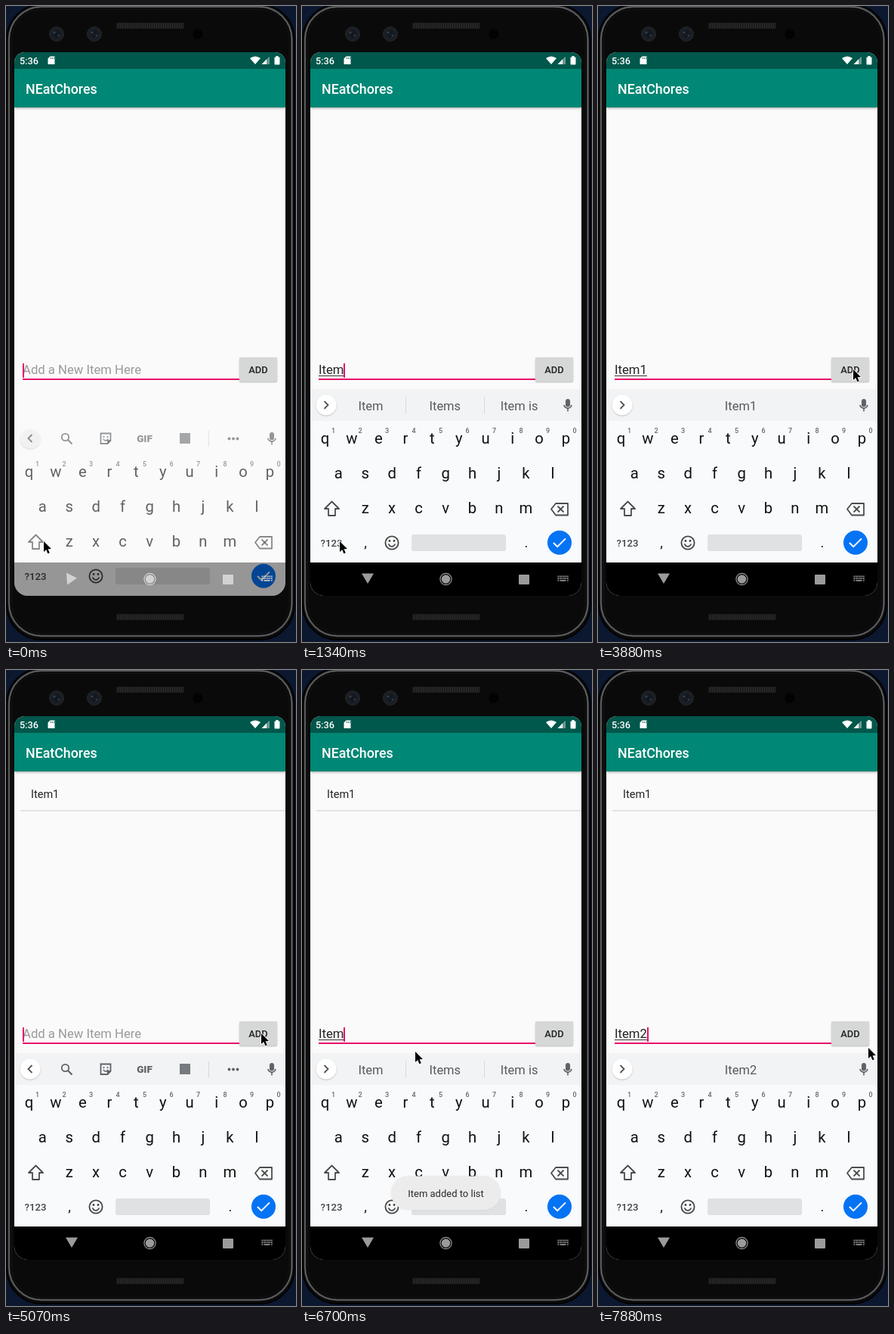
Animation of 384 by 840 pixels, one loop 8 s. Source, as an HTML page with a canvas:

```html
<!DOCTYPE html>
<html lang="en">
<head>
<meta charset="utf-8">
<title>Todo demo</title>
<style>
html, body { margin: 0; width: 100%; height: 100%; overflow: hidden; background: #0c1830; }
canvas { display: block; width: 384px; height: 840px; }
</style>
</head>
<body>
<canvas id="stage"></canvas>
<script>
const W = 384, H = 840, LOOP = 8000;
const canvas = document.getElementById('stage');
const ctx = canvas.getContext('2d');
const dpr = window.devicePixelRatio || 1;
canvas.width = W * dpr;
canvas.height = H * dpr;

const ACCENT = '#e8106a', ICON = '#5f6368';

// Each entry changes part of the state from its time on.
const events = [
  [0, { sliding: true, text: '', words: [], caret: true, mouse: [50, 707], toast: 0, pressed: false, listed: false }],
  [150, { sliding: false }],
  [300, { caret: false }],
  [900, { text: 'I', words: ['I', "I'm", "I'll"], caret: true }],
  [1050, { text: 'It', words: ['It', "It's", 'It is'] }],
  [1190, { text: 'Ite', words: ['Ite', 'Item', 'Items'] }],
  [1340, { text: 'Item', words: ['Item', 'Items', 'Item is'] }],
  [1940, { caret: false }],
  [2390, { text: 'Item1', words: ['Item1'], caret: true }],
  [2830, { caret: false }],
  [2980, { mouse: [82, 680] }],
  [3130, { mouse: [180, 601] }],
  [3280, { mouse: [290, 512] }],
  [3430, { mouse: [338, 480], caret: true }],
  [3880, { caret: false }],
  [4330, { caret: true }],
  [4920, { caret: false, pressed: true }],
  [5070, { text: '', words: [], caret: true, pressed: false, listed: true }],
  [5220, { toast: 0.5, mouse: [318, 483] }],
  [5360, { toast: 0.9, mouse: [250, 492] }],
  [5510, { toast: 1, mouse: [180, 501] }],
  [5660, { mouse: [150, 504], caret: false }],
  [6100, { caret: true }],
  [6250, { text: 'I', words: ['I', "I'm", "I'll"] }],
  [6550, { text: 'Ite', words: ['Ite', 'Item', 'Items'] }],
  [6700, { text: 'Item', words: ['Item', 'Items', 'Item is'] }],
  [7140, { caret: false, toast: 0.8 }],
  [7290, { toast: 0.3 }],
  [7440, { text: 'Item2', words: ['Item2'], caret: true, toast: 0 }],
  [7580, { mouse: [200, 504] }],
  [7730, { mouse: [300, 501] }],
  [7880, { mouse: [358, 499] }]
];

function stateAt(t) {
  const state = {};
  for (const [start, change] of events) if (start <= t) Object.assign(state, change);
  return state;
}

function rect(x, y, w, h, color) {
  ctx.fillStyle = color;
  ctx.fillRect(x, y, w, h);
}

function paint(fill, stroke, width) {
  if (fill) { ctx.fillStyle = fill; ctx.fill(); }
  if (stroke) { ctx.strokeStyle = stroke; ctx.lineWidth = width; ctx.stroke(); }
}

function box(x, y, w, h, r, fill, stroke, width = 1) {
  ctx.beginPath();
  ctx.roundRect(x, y, w, h, r);
  paint(fill, stroke, width);
}

function disc(x, y, r, fill, stroke, width = 1) {
  ctx.beginPath();
  ctx.arc(x, y, r, 0, Math.PI * 2);
  paint(fill, stroke, width);
}

function smile(x, y, r, color, width) {
  ctx.beginPath();
  ctx.arc(x, y, r, 0.2, Math.PI - 0.2);
  paint(null, color, width);
}

function trace(points, close) {
  ctx.beginPath();
  points.forEach(([x, y]) => ctx.lineTo(x, y));
  if (close) ctx.closePath();
}

function line(points, color, width = 2, close = false) {
  trace(points, close);
  paint(null, color, width);
}

function poly(points, color) {
  trace(points, true);
  paint(color);
}

function label(str, x, y, size, color, align = 'left', weight = 400) {
  ctx.font = `${weight} ${size}px Roboto, sans-serif`;
  ctx.textAlign = align;
  ctx.fillStyle = color;
  ctx.fillText(str, x, y);
}

function shadow(color, blur, dy) {
  ctx.shadowColor = color;
  ctx.shadowBlur = blur * dpr;
  ctx.shadowOffsetY = dy * dpr;
}

function noShadow() { shadow('transparent', 0, 0); }

function grille(y) {
  box(146, y, 90, 8, 2, '#1d1d1d');
  for (let x = 148; x < 235; x += 3) rect(x, y + 1, 1, 6, '#2a2a2a');
}

function phone() {
  rect(0, 0, W, H, '#0c1830');
  box(1, -2, 381, 839, 46, '#0b0b0c', '#030303', 2);
  box(4, 1, 374.5, 831, 43, '#080808', '#48494b', 2.5);
  box(4, 1, 374.5, 831, 43, null, '#66686b', 1);
  box(7.5, 4.5, 367.5, 824, 39, '#0a0a0a', '#151515');
  grille(22);
  grille(803);
  for (const x of [67, 117]) {
    disc(x, 37, 9.5, '#1b1e22', '#24272b');
    disc(x, 37, 5, '#111820');
    disc(x - 3, 35, 1.5, '#35434f');
    disc(x + 3, 39, 1.5, '#2b3640');
  }
  disc(254, 37, 6.5, '#020202');
}

function statusBar() {
  rect(11, 61, 359, 22, '#00574b');
  label('5:36', 18, 77, 12.7, '#fff', 'left', 500);
  poly([[58.5, 66.5], [64.5, 66.5], [64.5, 77], [55.5, 77], [55.5, 69.5]], '#fff');
  for (const x of [59, 61, 63]) rect(x, 68, 0.8, 2, '#00574b');
  ctx.beginPath();
  ctx.moveTo(330, 77);
  ctx.lineTo(323, 69);
  ctx.quadraticCurveTo(330, 64, 337, 69);
  ctx.closePath();
  paint('#fff');
  poly([[349, 66.5], [349, 77], [338.5, 77]], '#6a9992');
  poly([[345, 70.5], [345, 77], [338.5, 77]], '#fff');
  box(355.5, 67.5, 7, 10, 1, '#fff');
  rect(357.5, 66, 3, 2, '#fff');
}

function appBar() {
  shadow('rgba(0,0,0,.35)', 3, 1);
  rect(11, 83, 359, 51, '#008775');
  noShadow();
  label('NEatChores', 26, 116, 17.8, '#fff', 'left', 500);
}

function form(s) {
  if (s.text) {
    label(s.text, 22, 486, 16.7, '#222');
    rect(22, 488, ctx.measureText(s.text).width, 1, '#333');
  } else {
    label('Add a New Item Here', 22, 486, 16.7, '#9a9a9a');
  }
  rect(22, 492, 288, 2, ACCENT);
  if (s.caret) {
    ctx.font = '400 16.7px Roboto, sans-serif';
    rect(22 + Math.round(ctx.measureText(s.text).width), 472, 2, 19, ACCENT);
  }
  shadow('rgba(0,0,0,.28)', s.pressed ? 5 : 2, 1);
  box(309, 464, 50, 32, 2, s.pressed ? '#c4c5c5' : '#d6d7d7');
  noShadow();
  label('ADD', 334, 485, 12.9, '#222', 'center', 500);
}

function mic() {
  box(349, 519, 6, 10.5, 3, ICON);
  smile(352, 526, 5.2, ICON, 1.6);
  rect(351.2, 531, 1.6, 4.5, ICON);
}

function tools() {
  disc(78.5, 525.5, 4.7, null, ICON, 1.8);
  line([[82, 529], [87.5, 534.5]], ICON, 2.2);
  line([[125.5, 520.5], [138.5, 520.5], [138.5, 530], [134.5, 534], [125.5, 534]], ICON, 1.8, true);
  poly([[138.5, 529], [138.5, 530.5], [134.5, 534.5], [133.5, 529]], ICON);
  disc(129.5, 525, 1.1, ICON);
  disc(134.5, 525, 1.1, ICON);
  smile(132, 527, 3, ICON, 1.5);
  label('GIF', 183.5, 532, 13.5, ICON, 'center', 900);
  rect(230, 520, 14, 14, '#777b7f');
  rect(268, 517, 1, 21, '#d6d8da');
  for (const x of [295.5, 301, 306.5]) disc(x, 527.5, 1.9, ICON);
}

function strip(words) {
  shadow('rgba(0,0,0,.2)', 2, 1);
  disc(32, 527, 13.5, '#fff');
  noShadow();
  const dir = words.length ? 1 : -1;
  line([[32 - 2.5 * dir, 522], [32 + 2.5 * dir, 527], [32 - 2.5 * dir, 532]], '#555', 1.8);
  mic();
  if (!words.length) return tools();
  if (words.length === 1) return label(words[0], 189, 534, 16.5, '#555b60', 'center');
  words.forEach((word, i) => label(word, 91 + 98.3 * i, 534, 16.5, '#555b60', 'center'));
  rect(137, 516, 1, 22, '#d6d8da');
  rect(241, 516, 1, 22, '#d6d8da');
}

function keyRow(keys, x, y) {
  [...keys].forEach((key, i) => label(key, x + 35.45 * i, y, 20.3, '#111', 'center'));
}

function letterKeys() {
  keyRow('qwertyuiop', 30.5, 578);
  [...'1234567890'].forEach((n, i) => label(n, 41.5 + 35.5 * i, 564, 9, '#666', 'center', 500));
  keyRow('asdfghjkl', 48.3, 624);
  keyRow('zxcvbnm', 83.7, 670);
  ctx.lineJoin = 'round';
  line([[39.5, 654.5], [49, 664], [44, 664], [44, 673], [35, 673], [35, 664], [30, 664]], '#4c4c4c', 1.8, true);
  line([[330, 664.5], [336, 657], [352, 657], [352, 672.5], [336, 672.5]], '#4c4c4c', 1.8, true);
  line([[338.5, 660.5], [346.5, 668.5]], '#4c4c4c', 1.8);
  line([[346.5, 660.5], [338.5, 668.5]], '#4c4c4c', 1.8);
  ctx.lineJoin = 'miter';
}

function bottomKeys() {
  label('?123', 39, 714, 13.2, '#444', 'center', 500);
  label(',', 84, 715, 19, '#222', 'center');
  label('.', 297, 715, 19, '#222', 'center');
  disc(119, 709, 8.6, null, '#444', 1.8);
  disc(116, 706.5, 1.4, '#444');
  disc(122, 706.5, 1.4, '#444');
  smile(119, 709.5, 4.3, '#444', 1.7);
  box(145, 698, 125, 22, 3, '#e0e1e2');
  disc(341, 708.7, 16, '#0473f4');
  line([[333, 709], [338.2, 714.2], [349, 703.4]], '#fff', 2);
}

function keyboard({ words, sliding }) {
  ctx.save();
  if (sliding) {
    ctx.translate(0, 44);
    ctx.globalAlpha = 0.65;
  } else {
    rect(11, 506, 359, 229, '#f8fafc');
    rect(11, 506, 359, 42, '#f1f3f4');
  }
  strip(words);
  letterKeys();
  ctx.globalAlpha = 1;
  bottomKeys();
  ctx.restore();
}

function navBar(sliding) {
  rect(11, 735, 359, 44, sliding ? 'rgba(0,0,0,.4)' : '#000');
  const color = sliding ? '#d2d2d2' : '#9b9b9b';
  ctx.save();
  ctx.translate(87, 756);
  if (sliding) ctx.rotate(-1.65);
  poly([[-8, -6.5], [8, -6.5], [0, 7]], color);
  ctx.restore();
  disc(190.5, 757, 5.8, color);
  disc(190.5, 757, 7.6, null, color, 1.2);
  box(287, 751, 14, 13, 1, color);
  for (let row = 0; row < 3; row++) {
    for (let col = 0; col < 6; col++) {
      if (row < 2 || col === 0 || col === 5) rect(338.5 + 2.5 * col, 752.5 + 2.7 * row, 1.7, 1.7, color);
    }
  }
  rect(341.5, 758, 8, 1.6, color);
}

function toast(alpha) {
  if (!alpha) return;
  ctx.save();
  ctx.globalAlpha = alpha;
  shadow('rgba(0,0,0,.08)', 2, 0);
  box(118, 668.5, 145, 44.5, 22, '#ececec');
  noShadow();
  label('Item added to list', 190.5, 696, 13, '#2b2b2b', 'center');
  ctx.restore();
}

function pointer([x, y]) {
  ctx.save();
  ctx.translate(x, y);
  const shape = [[0, 0], [0, 14], [3.2, 11], [5.4, 16.2], [7.8, 15.2], [5.6, 10.2], [10, 10]];
  line(shape, '#fff', 1.6, true);
  poly(shape, '#000');
  ctx.restore();
}

function draw(t) {
  const s = stateAt(t);
  ctx.setTransform(dpr, 0, 0, dpr, 0, 0);
  phone();

  ctx.save();
  ctx.beginPath();
  ctx.roundRect(11, 61, 359, 718, [14, 14, 18, 18]);
  ctx.clip();
  rect(11, 61, 359, 718, '#fafafa');
  appBar();
  statusBar();
  if (s.listed) {
    label('Item1', 33, 169, 14.5, '#222');
    rect(19, 185, 351, 1.5, '#dedede');
  }
  form(s);
  keyboard(s);
  navBar(s.sliding);
  toast(s.toast);
  ctx.restore();

  pointer(s.mouse);
}

const begin = performance.now();
function tick() {
  draw((performance.now() - begin) % LOOP);
  requestAnimationFrame(tick);
}
tick();
</script>
</body>
</html>
```
